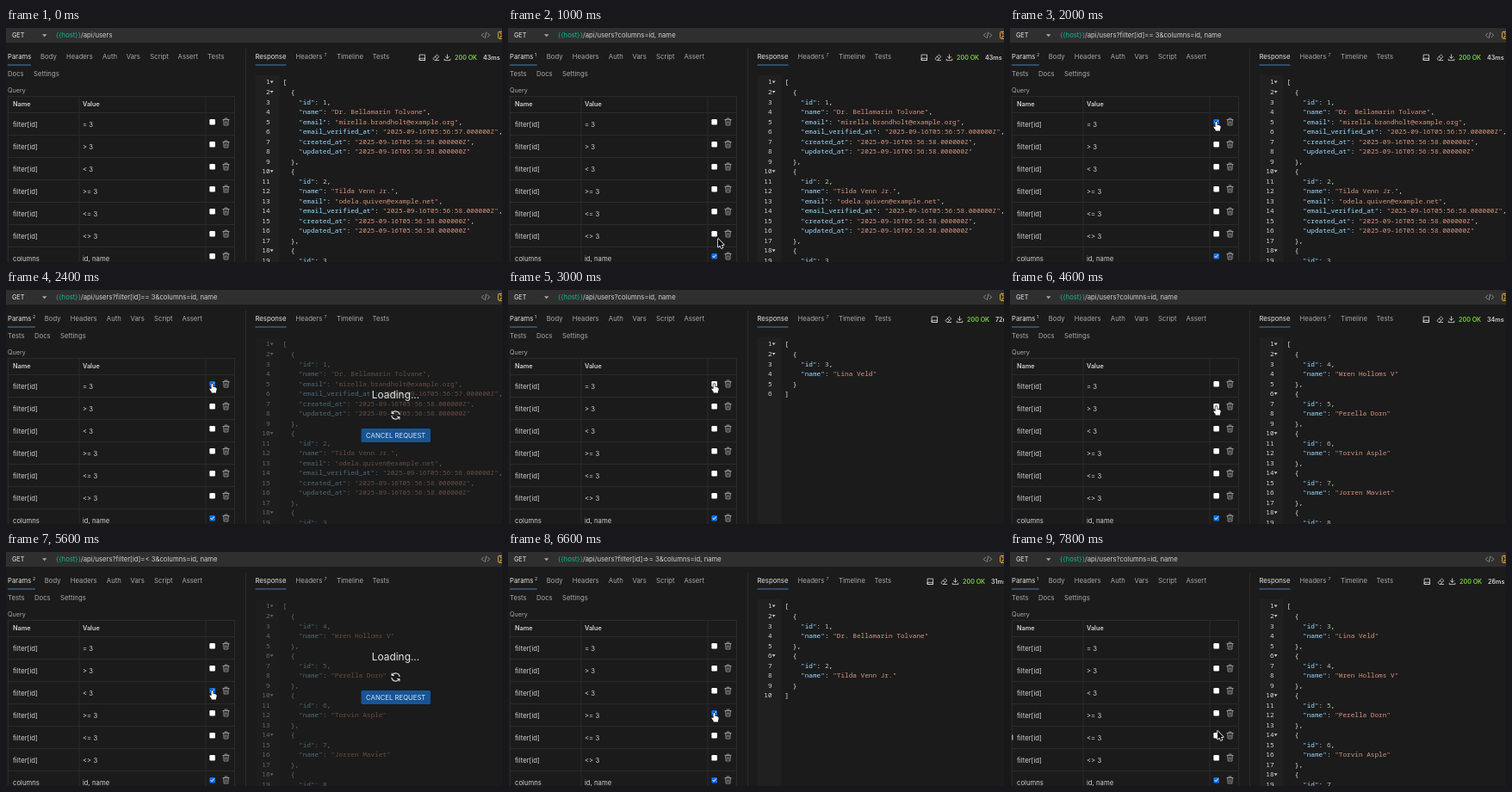
Recreate the animation shown at these times as an HTML page with a canvas. Size 576 px wide and 272 px high, loop 8 s.

```html
<!DOCTYPE html>
<html lang="en">
<head>
<meta charset="utf-8">
<title>API client</title>
<style>
  html, body { margin: 0; width: 100%; height: 100%; overflow: hidden; background: #1b1b1c; }
  canvas { display: block; }
</style>
</head>
<body>
<canvas id="stage" width="576" height="272"></canvas>
<script>
const ctx = document.getElementById('stage').getContext('2d');
const LOOP = 8000, STEP = 200;
const UI = 'Inter, sans-serif', MONO = '"Noto Sans Mono", monospace';
const SIZE = 7.73, CHAR = SIZE * 0.6;
const C = {
  bg: '#1b1b1c', bar: '#2f2f30', gutter: '#202021', line: '#2a2a2b', text: '#d0d0d0', dim: '#a8a8a8',
  host: '#14b789', green: '#76cc3e', accent: '#4a7fae', key: '#9cdcfe',
  string: '#d5967c', number: '#b5cea8', punct: '#ececec', save: '#dca13c'
};

const params = ['= 3', '> 3', '< 3', '>= 3', '<= 3', '<> 3'];
const people = ['Dr. Bellamarin Tolvane', 'Tilda Venn Jr.', 'Lina Veld', 'Wren Holloms V',
  'Perella Dorn', 'Torvin Asple', 'Jorren Maviet', 'Nella Quorve'];
const users = people.map((name, i) => ({ id: i + 1, name }));
const stamp = s => `2025-09-16T05:56:${s}.000000Z`;
const fullUsers = users.slice(0, 3).map((user, i) => ({
  ...user,
  email: ['mirella.brandholt@example.org', 'odela.quiven@example.net', 'lina@example.org'][i],
  email_verified_at: stamp(i ? 58 : 57), created_at: stamp(58), updated_at: stamp(58)
}));

const response = (data, time, shift) =>
  ({ lines: JSON.stringify(data, null, 2).split('\n'), time, shift });
const initial = response(fullUsers, '43ms', 0);

// One request per filter: tick, send, receive, untick.
const requests = [
  { row: 0, on: 2000, send: 2400, done: 2600, off: 3000, result: response(users.slice(2, 3), '72ms', 12) },
  { row: 1, on: 3600, send: 4000, done: 4200, off: 4600, result: response(users.slice(3), '34ms', 0) },
  { row: 2, on: 5200, send: 5600, done: 5800, off: 6200, result: response(users.slice(0, 2), '31ms', 7) },
  { row: 3, on: 6600, send: 7000, done: 7200, off: 7400, result: response(users.slice(2), '26ms', 1) }
];
const COLUMNS_ON = 600;

// Pointer path: time, x, y
const path = [
  [0, 247, 290], [400, 240, 265], [800, 240, 265], [1000, 244, 245], [1600, 239.5, 109],
  [3000, 239.5, 109], [3400, 239.5, 135], [4600, 239.5, 135], [5000, 239.5, 161],
  [6200, 239.5, 161], [6500, 239.5, 187], [7400, 239.5, 187], [7800, 241, 208]
];

function pointerAt(t) {
  const i = path.findIndex(p => p[0] > t);
  if (i < 0) return path[path.length - 1].slice(1);
  const [t0, x0, y0] = path[i - 1], [t1, x1, y1] = path[i];
  const u = (t - t0) / (t1 - t0), e = u * u * (3 - 2 * u);
  return [x0 + (x1 - x0) * e, y0 + (y1 - y0) * e];
}

function text(str, x, y, { color = C.text, size = SIZE, weight = 400, font = UI, align = 'left' } = {}) {
  ctx.font = `${weight} ${size}px ${font}`;
  ctx.fillStyle = color;
  ctx.textAlign = align;
  ctx.fillText(str, x, y + size * 0.36);
  return ctx.measureText(str).width;
}

function rect(x, y, w, h, color, radius = 0) {
  ctx.fillStyle = color;
  ctx.beginPath();
  ctx.roundRect(x, y, w, h, radius);
  ctx.fill();
}

function downArrow(x, y, w, h, color) {
  ctx.fillStyle = color;
  ctx.beginPath();
  ctx.moveTo(x, y);
  ctx.lineTo(x + w, y);
  ctx.lineTo(x + w / 2, y + h);
  ctx.fill();
}

function icon(d, x, y, color = C.text, width = 0.8, fill) {
  ctx.save();
  ctx.translate(x, y);
  ctx.lineWidth = width;
  ctx.lineJoin = ctx.lineCap = 'round';
  ctx.strokeStyle = color;
  const shape = new Path2D(d);
  ctx.stroke(shape);
  if (fill) { ctx.fillStyle = fill; ctx.fill(shape); }
  ctx.restore();
}

const ICON = {
  code: 'M-2.3-2.3L-4.6 0L-2.3 2.3M2.3-2.3L4.6 0L2.3 2.3M.8-3.3L-.8 3.3',
  save: 'M4-4H-2.5Q-4-4-4-2.5V2.5Q-4 4-2.5 4H4M-1.5-4V-1.5H4M-1.5 4V1H4',
  panel: 'M-3-3.2H3V3.2H-3ZM-3 1H3V3.2H-3Z',
  eraser: 'M-3.3 1L1-3.2L3.3-1L-.8 3.2H-1.4ZM-1.2-1L1.2 1.2M-.8 3.2H3.2',
  download: 'M0-3.4V1M-2-1L0 1L2-1M-3.3 1.8V3.3H3.3V1.8',
  trash: 'M-3.7-2.4H3.7M-1.4-2.4V-4H1.4V-2.4M-2.9-2.4L-2.4 4H2.4L2.9-2.4M-.9-.4V2.2M.9-.4V2.2',
  tick: 'M-1.8 0L-.5 1.4L1.9-1.5',
  refresh: 'M4.6-.8A4.7 4.7 0 0 0-4-2.4M-4.4-4.4V-2H-2M-4.6.8A4.7 4.7 0 0 0 4 2.4M4.4 4.4V2H2',
  arrow: 'M0 0V9.6L2.2 7.6L3.8 11L5.4 10.3L3.9 7H6.8Z',
  hand: 'M-1 .6Q0-.6 1 .6V4L2.3 3.8L3.6 4.3L5 4.9Q5.5 7 4.5 8.8V10.4H-.9V9.2Q-2.6 7.5-3.3 5.8Q-2.6 4.8-1 6.3Z'
};

function drawUrl(query) {
  rect(0, 0, 576, 17, C.bar);
  text('GET', 7, 8.5, { size: 7.2, weight: 500 });
  downArrow(42, 7.3, 5.4, 2.9, C.dim);
  const w = text('{{host}}', 58, 8.5, { color: C.host });
  text('/api/users' + (query ? '?' + query : ''), 58 + w, 8.5);
  icon(ICON.code, 557, 8.3, C.dim);
  icon(ICON.save, 575.5, 8.3, C.save, 1);
}

function drawRequestTabs(count) {
  const shift = count ? 4.8 : 0;
  const tabs = { Body: 40, Headers: 70, Auth: 112, Vars: 139.7, Script: 167.3, Assert: 199.6 };
  text('Params', 2, 33.5, { color: '#e2e2e2' });
  if (count) text(count, 31, 31, { size: 5.3 });
  rect(2, 42.5, 27 + shift, 1, C.accent);
  for (const [name, x] of Object.entries(tabs)) text(name, x + shift, 33.5, { color: C.dim });
  if (!count) text('Tests', 234, 33.5, { color: C.dim });
  const second = count ? { Tests: 2, Docs: 33, Settings: 63 } : { Docs: 2, Settings: 32 };
  for (const [name, x] of Object.entries(second)) text(name, x, 53, { color: C.dim });
}

function drawTable(checkedRow, columnsOn) {
  text('Query', 2, 72, { size: 7.2, color: C.dim });
  ctx.strokeStyle = C.line;
  ctx.lineWidth = 1;
  ctx.strokeRect(2.5, 79.5, 263, 210);
  for (const x of [85, 232]) rect(x - 0.5, 79, 1, 200, C.line);
  text('Name', 8, 88.8, { weight: 600, size: 7.3 });
  text('Value', 89, 88.8, { weight: 600, size: 7.3 });
  [...params, 'id, name'].forEach((value, i) => {
    const y = 112 + i * 26, last = i === params.length;
    rect(3, y - 14, 263, 1, C.line);
    text(last ? 'columns' : 'filter[id]', 8, y);
    text(value, 89, y);
    const checked = last ? columnsOn : i === checkedRow;
    rect(236.4, y - 6, 6.5, 6.5, checked ? '#0b73e8' : '#fff', 1.2);
    if (checked) icon(ICON.tick, 239.6, y - 2.7, '#fff', 1);
    icon(ICON.trash, 255.5, y - 3, C.dim);
  });
}

function drawCode(lines) {
  rect(289.5, 55, 28, 217, C.gutter);
  lines.slice(0, 19).forEach((line, i) => {
    const y = 62.7 + i * 11.52;
    const mono = color => ({ color, font: MONO, weight: 500 });
    text(i + 1, 306.6, y, { ...mono('#d8d8d8'), align: 'right' });
    if (/[[{]$/.test(line)) downArrow(306.6, y - 1.2, 4, 2.8, '#c4c4c4');
    for (const { 0: token, index } of line.matchAll(/"[^"]*"|\d+|[^\s"\d]+/g)) {
      const color = token[0] === '"' ? (line[index + token.length] === ':' ? C.key : C.string)
        : /\d/.test(token) ? C.number : C.punct;
      text(token, 321.5 + index * CHAR, y, mono(color));
    }
  });
}

function drawResponse({ lines, time, shift }, loading) {
  rect(278, 24, 1, 248, C.line);
  text('Response', 289.5, 33.5, { color: '#e2e2e2' });
  rect(289.5, 42.5, 36, 1, C.accent);
  for (const [name, x] of Object.entries({ Headers: 336.5, Timeline: 384, Tests: 425.5 }))
    text(name, x, 33.5, { color: C.dim });
  text('7', 369.5, 31, { size: 5.3, color: C.dim });
  drawCode(lines);
  if (!loading) {
    for (const [name, x] of Object.entries({ panel: 483.5, eraser: 499.5, download: 512.5 }))
      icon(ICON[name], x + shift, 34.3, '#dcdcdc');
    text('200 OK', 521 + shift, 34, { size: 7.13, weight: 600, color: C.green });
    text(time, 554 + shift, 34, { size: 7.13, weight: 600 });
    return;
  }
  rect(279, 50, 297, 222, 'rgba(27, 27, 28, 0.6)');
  text('Loading...', 452.5, 121.5, { size: 11.9, color: '#e6e6e6', align: 'center' });
  icon(ICON.refresh, 452.5, 145.5, '#d8d8d8', 1.1);
  rect(412.5, 161, 80.5, 16, '#185495', 1.5);
  text('CANCEL REQUEST', 452.7, 169, { color: '#d6e6f7', align: 'center' });
}

function drawPointer(t) {
  const [x, y] = pointerAt(t);
  const overBox = x < 240.6 && Math.abs((y - 109 + 260) % 26) < 2;
  if (overBox) icon(ICON.hand, x, y, '#111', 1.3, '#fff');
  else icon(ICON.arrow, x, y, '#fff', 1.5, '#000');
}

function draw(t) {
  const active = requests.find(r => t >= r.on && t < r.off);
  const finished = requests.filter(r => t >= r.done).pop();
  const loading = requests.some(r => t >= r.send && t < r.done);
  const columnsOn = t >= COLUMNS_ON;
  const query = [active && 'filter[id]=' + params[active.row], columnsOn && 'columns=id, name'].filter(Boolean);

  rect(0, 0, 576, 272, C.bg);
  drawUrl(query.join('&'));
  drawRequestTabs(query.length);
  drawTable(active ? active.row : -1, columnsOn);
  if (t >= 7600) rect(2, 212.5, 1.5, 6, C.dim);
  drawResponse(finished ? finished.result : initial, loading);
  drawPointer(t);
}

function frame(now) {
  draw(Math.floor((now % LOOP) / STEP) * STEP);
  requestAnimationFrame(frame);
}
requestAnimationFrame(frame);
</script>
</body>
</html>
```
